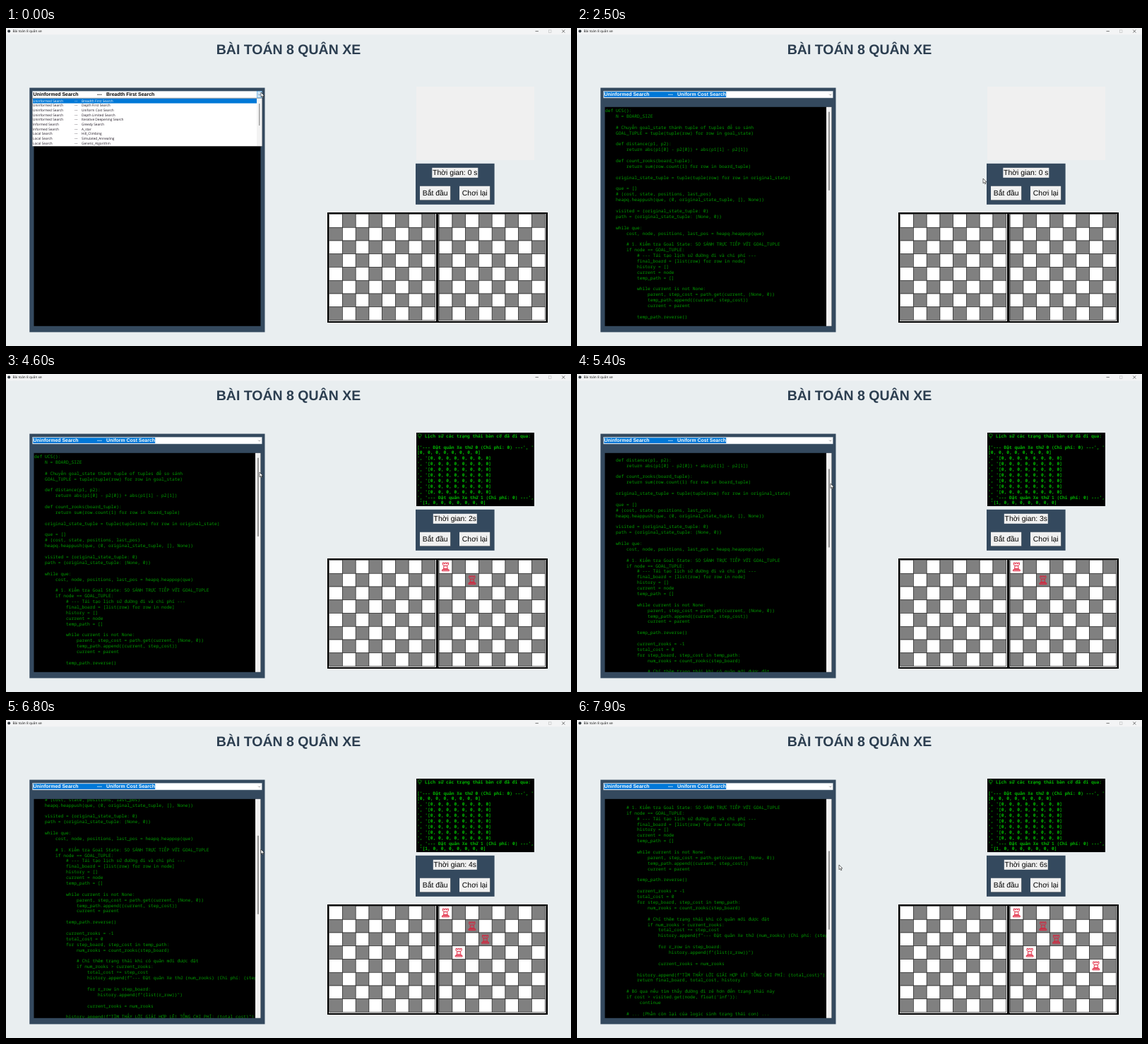
These frames come from a looping animation (800 px wide and 450 px high, 8000 ms). An HTML page:

```html
<!DOCTYPE html>
<html lang="vi">
<head>
<meta charset="utf-8">
<title>Bài toán 8 quân xe</title>
<style>
html, body { margin: 0; width: 100%; height: 100%; overflow: hidden; background: #e9eef0; }
svg { display: block; width: 800px; height: 450px; }
text { white-space: pre; text-rendering: geometricPrecision; }
.title { font: bold 19.5px "Liberation Sans", Arial, sans-serif; }
.ui { font: 4.75px "Open Sans", "Noto Sans", sans-serif; }
.arial { font: 10.4px "Liberation Sans", Arial, sans-serif; }
.combo { font: bold 6.95px "Liberation Sans", Arial, sans-serif; }
.mono { font: 6.25px "Noto Sans Mono", "DejaVu Sans Mono", monospace; }
#log .mono { font-weight: 600; }
</style>
</head>
<body>
<svg id="stage" viewBox="0 0 800 450"></svg>
<script>
const code = `def UCS():
    N = BOARD_SIZE

    # Chuyển goal_state thành tuple of tuples để so sánh
    GOAL_TUPLE = tuple(tuple(row) for row in goal_state)

    def distance(p1, p2):
        return abs(p1[0] - p2[0]) + abs(p1[1] - p2[1])

    def count_rooks(board_tuple):
        return sum(row.count(1) for row in board_tuple)

    original_state_tuple = tuple(tuple(row) for row in original_state)

    que = []
    # (cost, state, positions, last_pos)
    heapq.heappush(que, (0, original_state_tuple, [], None))

    visited = {original_state_tuple: 0}
    path = {original_state_tuple: (None, 0)}

    while que:
        cost, node, positions, last_pos = heapq.heappop(que)

        # 1. Kiểm tra Goal State: SO SÁNH TRỰC TIẾP VỚI GOAL_TUPLE
        if node == GOAL_TUPLE:
            # --- Tái tạo lịch sử đường đi và chi phí ---
            final_board = [list(row) for row in node]
            history = []
            current = node
            temp_path = []

            while current is not None:
                parent, step_cost = path.get(current, (None, 0))
                temp_path.append((current, step_cost))
                current = parent

            temp_path.reverse()

            current_rooks = -1
            total_cost = 0
            for step_board, step_cost in temp_path:
                num_rooks = count_rooks(step_board)

                # Chỉ thêm trạng thái khi có quân mới được đặt
                if num_rooks > current_rooks:
                    total_cost += step_cost
                    history.append(f"--- Đặt quân Xe thứ {num_rooks} (Chi phí: {step_cost}) ---")

                    for r_row in step_board:
                        history.append(f"{list(r_row)}")

                    current_rooks = num_rooks

            history.append(f"TÌM THẤY LỜI GIẢI HỢP LỆ! TỔNG CHI PHÍ: {total_cost}")
            return final_board, total_cost, history

        # Bỏ qua nếu tìm thấy đường đi rẻ hơn đến trạng thái này
        if cost > visited.get(node, float('inf')):
             continue

        # ... (Phần còn lại của logic sinh trạng thái con) ...`.split("\n");

const zeros = "[0, 0, 0, 0, 0, 0, 0, 0]";
const history = ["", "", "['--- Đặt quân Xe thứ 0 (Chi phí: 0) ---', '", zeros,
  ...Array(7).fill("', '" + zeros),
  "', '--- Đặt quân Xe thứ 1 (Chi phí: 0) ---',", " '" + zeros.replace("0", "1")];
const uninformed = "Uninformed Search", informed = "Informed Search", local = "Local Search";
const options = [
  [uninformed, "Breadth First Search"], [uninformed, "Depth First Search"],
  [uninformed, "Uniform Cost Search"], [uninformed, "Depth Limited Search"],
  [uninformed, "Iterative Deepening Search"], [informed, "Greedy Search"], [informed, "A_star"],
  [local, "Hill_Climbing"], [local, "Simulated_Annealing"], [local, "Genetic_Algorithm"]];
const rookCells = [[0, 0], [1, 2], [2, 3], [3, 1], [4, 6]];

const LINE = 7.89, ROW = 6.65, CELL = 18.75, TOP = 263.5;
const PICK = 1900, SOLVED = 3650;
// [ms, x, y] of the pointer tip and [ms, px] of the code scroll
const pointer = [[0, 361, 91], [400, 361, 91], [1100, 326, 112], [1500, 318, 117], [1900, 318, 117],
  [2500, 575, 213], [2800, 605, 232], [3300, 605, 232], [4300, 359, 139], [4600, 359, 139],
  [5400, 359, 155], [6800, 361, 183], [7900, 371, 205]];
const scrolling = [[4600, 0], [5400, 42.7], [6800, 122.7], [7900, 182.5]];

const esc = s => s.replace(/&/g, "&amp;").replace(/</g, "&lt;");
const rect = (x, y, w, h, fill, more = "") =>
  `<rect x="${x}" y="${y}" width="${w}" height="${h}" fill="${fill}" ${more}/>`;
const text = (x, y, cls, s, more = "") => `<text x="${x}" y="${y}" class="${cls}" ${more}>${esc(s)}</text>`;
const lines = (rows, x, y) => rows.map((s, i) => s && text(x, y + i * LINE, "mono", s)).join("");
const middle = 'text-anchor="middle"';

function board(x) {
  let s = rect(x - .7, TOP - .6, 152, 152, "#f0f0f0");
  for (let r = 0; r < 8; r++)
    for (let c = 0; c < 8; c++)
      s += rect(x + c * CELL, TOP + r * CELL, CELL, CELL, (r + c) % 2 ? "#808080" : "#fff",
        'stroke="#222" stroke-width=".6"');
  return s;
}

const rook = ([r, c]) => `<path class="rook" transform="translate(${613 + (c + .5) * CELL} ${TOP + (r + .5) * CELL})"
  d="M-4.1-5.8v2.9l1.7 1.4L-2.8 2.6l-1.2 1.4H4L2.8 2.6 2.4-1.5l1.7-1.4V-5.8H2.2v1.3H1V-5.8H-1v1.3H-2.2V-5.8ZM-4.9 4.1H4.9V5.9H-4.9ZM-2.4-1.5H2.4M-2.8 2.6H2.8"
  fill="#e8142f" fill-opacity=".12" stroke="#e01a36" stroke-width=".85"/>`;

const button = (x, label) => rect(x, 223.8, 43.6, 20, "#6f7478") + rect(x, 223.8, 43, 19.4, "#f0f0f0") +
  text(x + 21.7, 237.4, "arial", label, middle);

const comboText = (name, fill) => `<g fill="${fill}">` + text(38.6, 96.4, "combo", uninformed) +
  text(129, 96.4, "combo", "---") + text(142, 96.4, "combo", name) + "</g>";

const option = ([kind, name], i) => {
  const y = 104.8 + i * ROW;
  return `<g class="option">${text(38, y, "ui", kind)}${text(97, y, "ui", "---")}${text(107, y, "ui", name)}</g>`;
};

const stage = document.getElementById("stage");
stage.innerHTML = `
<clipPath id="codeClip">${rect(39.5, 112, 313.5, 309.8, "#000")}</clipPath>
<clipPath id="logClip">${rect(581, 83, 167, 104, "#000")}</clipPath>
${rect(0, 0, 800, 450, "#e9eef0")}${rect(0, 0, 800, 9.3, "#f3f4f5")}
<circle cx="4.2" cy="4.6" r="2" fill="#30383e"/>
${text(9.5, 6.4, "ui", "Bài toán 8 quân xe", 'fill="#111"')}
<path d="M749.5 4.6h4.4M787.3 2.6l4 4M791.3 2.6l-4 4" stroke="#222" stroke-width=".6"/>
${rect(768.6, 2.9, 3.4, 3.4, "none", 'stroke="#bbb" stroke-width=".6"')}
${text(400, 37, "title", "BÀI TOÁN 8 QUÂN XE", middle + ' fill="#2c3e50"')}
${rect(33.3, 84.6, 333.2, 345.8, "#34495e")}
${rect(39.5, 111.8, 321, 310, "#000")}
${rect(37.4, 89.2, 325, 9.8, "#fff", 'stroke="#8a9aa8" stroke-width=".5"')}
<g id="arrowHover">${rect(355.3, 89.6, 6.8, 9, "#cce4f7", 'stroke="#2a8ad4" stroke-width=".5"')}</g>
<path d="M357.2 93.6l1.5 1.5 1.5-1.5" fill="none" stroke="#555" stroke-width=".6"/>
<g id="popup">
  ${comboText("Breadth First Search", "#000")}
  ${rect(37.3, 99.4, 325.2, 67.8, "#fff", 'stroke="#777" stroke-width=".4"')}
  ${rect(355, 99.8, 7.2, 67.2, "#f3f3f3")}${rect(358.2, 107, 1.1, 31, "#858585")}
  <g id="hover">${rect(38, 99.9, 317, ROW, "#0078d7")}</g>
  ${options.map(option).join("")}
</g>
<g id="chosen">
  ${rect(38.4, 90.2, 172.8, 7.8, "#0078d7")}${comboText("Uniform Cost Search", "#fff")}
  <g clip-path="url(#codeClip)"><g id="code" fill="#009c00">${lines(code, 40, 119)}</g></g>
  ${rect(353, 111.8, 7.5, 310, "#f0f0f0")}
  <g id="thumb">${rect(356.1, 118.5, 1.7, 111.5, "#858585", 'rx=".8"')}</g>
</g>
${rect(581, 83, 167, 104, "#f0f0f0")}
<g id="log" clip-path="url(#logClip)" fill="#00b400">
  ${rect(581, 83, 167, 104, "#000")}
  <path d="M584.6 88.8c-2.4-2-1-4.2 1.1-4.2s3.5 2.2 1.1 4.2ZM584.6 90.2h2.2" fill="none" stroke="#00b400" stroke-width=".8"/>
  ${text(593, 89.7, "mono", "Lịch sử các trạng thái bàn cờ đã đi qua:")}
  ${lines(history, 582, 89.8)}
</g>
${rect(580, 191.8, 111.6, 58, "#34495e")}
<rect id="clockBox" y="197.8" height="14" fill="#f0f0f0"/>
${text(635.8, 208.4, "arial", "", middle + ' id="clock"')}
${button(586, "Bắt đầu")}${button(642, "Chơi lại")}
${rect(455, 261, 312, 156, "#000")}${board(457.7)}${board(613.2)}
${rookCells.map(rook).join("")}
<path id="pointer" d="M0 0V6.7L1.6 5.3 2.7 7.8 3.8 7.3 2.7 4.9H4.8Z" fill="#fff" stroke="#000" stroke-width=".55"/>`;

const $ = id => document.getElementById(id);
const show = (el, on) => el.style.display = on ? "" : "none";
const move = (id, x, y) => $(id).setAttribute("transform", `translate(${x} ${y})`);
const optionEls = document.querySelectorAll(".option");
const rookEls = document.querySelectorAll(".rook");

function at(keys, t, k) {
  const i = keys.findIndex(key => key[0] >= t);
  if (i < 0) return keys[keys.length - 1][k];
  if (i === 0) return keys[0][k];
  const a = keys[i - 1], b = keys[i];
  return a[k] + (b[k] - a[k]) * (t - a[0]) / (b[0] - a[0]);
}

function draw(t) {
  const x = at(pointer, t, 1), y = at(pointer, t, 2);
  move("pointer", x, y);

  const picked = t >= PICK;
  show($("popup"), !picked);
  show($("chosen"), picked);
  show($("arrowHover"), x > 355 && y < 99 && !picked);
  const row = Math.max(0, Math.floor((y - 99.8) / ROW));
  move("hover", 0, row * ROW);
  optionEls.forEach((el, i) => el.setAttribute("fill", i === row ? "#fff" : "#1c1420"));

  const scroll = at(scrolling, t, 1);
  move("code", 0, -scroll);
  move("thumb", 0, scroll / 2.73);

  show($("log"), t >= SOLVED);
  rookEls.forEach((el, i) => show(el, t >= SOLVED + i * 950));
  const sec = Math.max(0, Math.floor((t - 1850) / 1000));
  $("clock").textContent = "Thời gian: " + (sec ? sec + "s" : "0 s");
  const w = sec ? 62 : 65;
  $("clockBox").setAttribute("x", 635.8 - w / 2);
  $("clockBox").setAttribute("width", w);
}

function frame() {
  draw(Math.floor(performance.now() % 8000 / 100) * 100);
  requestAnimationFrame(frame);
}
frame();
</script>
</body>
</html>
```
